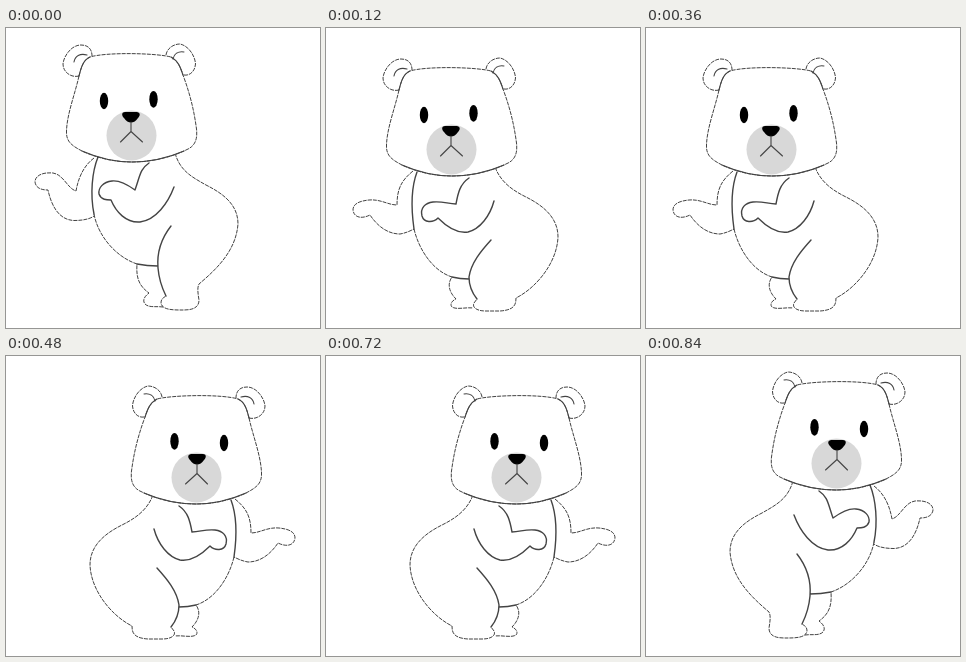
Animation, 314 px wide and 300 px high, one loop 960 ms. Source, as an HTML page:

```html
<!DOCTYPE html>
<html lang="en">
<head>
<meta charset="utf-8">
<title>Dancing bear</title>
<style>
  html, body { margin: 0; width: 100%; height: 100%; overflow: hidden; background: #fff; }
  svg { display: block; width: 100vw; height: 100vh; }
  path { fill: none; stroke-linejoin: round; }
  .edge { stroke: #111; stroke-width: .8; stroke-dasharray: 4 1; }
  .line { stroke: #444; stroke-width: 1.4; stroke-linecap: round; }
  .thin { stroke-width: 1.1; }
  .fill { fill: #fff; }
</style>
</head>
<body>
<svg viewBox="0 0 314 300">
  <g id="bear">
    <g id="up">
      <path class="edge" d="M169 125C174 143 186 149 200 157C218 166 232 177 232 196C230 222 212 240 193 256C191 260 192 266 193 272C193 282 182 282 176 282C167 282 156 282 155 275C155 271 157 270 160 268"/>
      <path class="edge" d="M88 186C92 208 110 229 131 236C130 250 133 258 143 265C139 268 136 272 139 276C143 280 150 278 157 279"/>
      <path class="edge" d="M88 130C80 136 73 146 70 163C61 160 58 147 47 145C36 144 29 148 29 154C30 161 37 162 42 162C45 176 52 192 68 192.500C77 192.500 84 191 88 188"/>
      <path class="line" d="M92 129C86 144 84 166 88 186M131 236Q141 238 152 238M165 198C154 212 151 228 152 240C153 252 157 262 160 268"/>
      <path class="line" d="M143 135C134 141 134 148 129 162C122 157 114 152 106 153C97 154 92 160 93 166C95 172 101 172 105 172C110 184 120 195 134 194C150 192 162 175 168 159"/>
    </g>
    <g id="down">
      <path class="edge" d="M169 139C175 155 188 163 200 169C218 178 232 190 232 209C231 235 210 260 190 270C190 277 188 282 174 283H160C150 283 146 279 148 275L151 271"/>
      <path class="edge" d="M88 201C93 222 107 243 126 249C121 256 123 264 130 271C125 273 124 277 126 279C131 282 140 279 147 280"/>
      <path class="edge" d="M87 143C76 152 71 160 71 177C62 177 55 171 43 172C33 173 27 176 27 182C28 190 36 191 44 187C50 196 60 206 74 206C80 205 84 203 88 201"/>
      <path class="line" d="M91 144C85 160 85 180 88 201M126 249Q134 251 143 251M165 212C155 223 145 235 143 249C143 258 147 266 151 271"/>
      <path class="line" d="M143 150C134 156 132 165 130 176C122 176 117 173 107 174C99 175 94 180 96 188C98 195 107 195 112 190C118 196 130 206 142 204C154 201 164 188 168 173"/>
    </g>
    <g id="head">
      <path class="edge fill" d="M73 48C65 50 57 44 57 36C58 27 66 17 75 17C82 17 86 21 86 28"/>
      <path class="edge fill" d="M160 27C161 20 168 16 174 16C183 18 189 28 189.500 36C189 43 184 48 178 47"/>
      <path class="edge fill" d="M73 48C69 66 61 86 60.500 103C60 114 66 118 78 124C92 130 108 134 126 134C146 134 166 129 180 122C190 118 191.500 110 190.500 101C188 82 184 66 177 47C174 38 172 33 165 29C150 25 100 24 84 29C77 32 75 40 73 48"/>
      <path class="line thin" d="M73 48C75 40 77 32 84 29M165 29C172 33 174 38 177 47M76 123C92 130 108 134 126 134C146 134 164 129 178 123"/>
      <path class="line thin" d="M68 34C69 28 74 25 81 27M167 31C168 26 172 23 178 24"/>
      <circle cx="125.5" cy="107.5" r="25" fill="#d8d8d8"/>
      <ellipse cx="98" cy="73" rx="4.2" ry="8.2"/>
      <ellipse cx="147.5" cy="71.3" rx="4.2" ry="8.4"/>
      <path style="fill:#000" d="M119 84H131C135 85 134 88 132 90C128 96 122 96 118 90C115 87 116 84 119 84Z"/>
      <path class="line thin" d="M125 94V103.500L114.500 114M125 103.500L136.500 114"/>
    </g>
  </g>
</svg>
<script>
  const el = id => document.getElementById(id);
  const bear = el("bear"), up = el("up"), down = el("down"), head = el("head");
  const BEAT = 120, BEATS = 8;

  function draw(ms) {
    const beat = Math.floor(ms / BEAT) % BEATS;
    const right = beat >= BEATS / 2;
    const low = (beat % 2 === 1) !== right;
    bear.setAttribute("transform", right ? "matrix(-1 0 0 1 316 0)" : "");
    head.setAttribute("transform", low ? "translate(0 14)" : "");
    up.style.display = low ? "none" : "";
    down.style.display = low ? "" : "none";
  }

  let start;
  function tick(now) {
    start ??= now;
    draw(Math.max(0, now - start));
    requestAnimationFrame(tick);
  }
  draw(0);
  requestAnimationFrame(tick);
</script>
</body>
</html>
```
